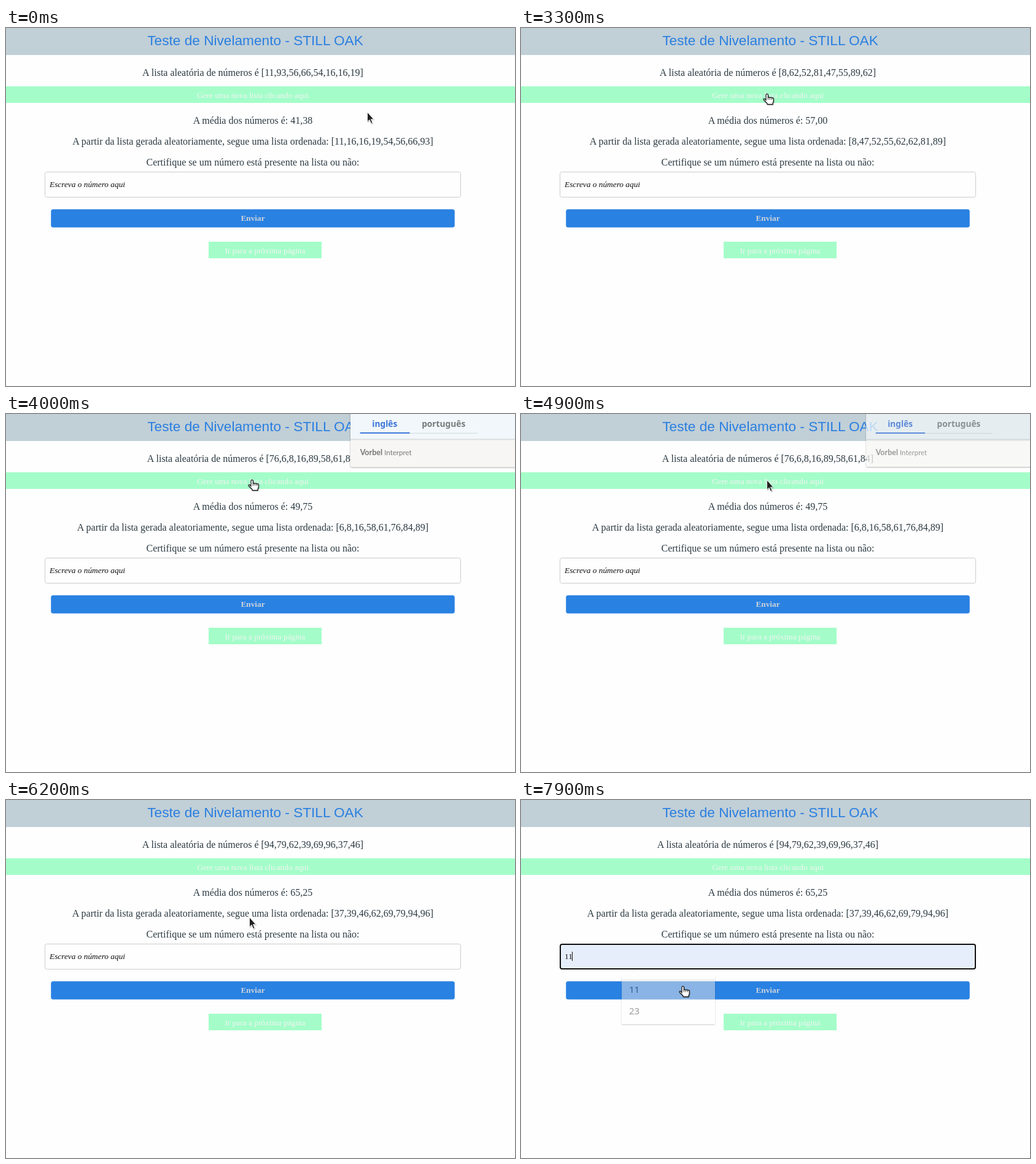
Animation of 829x583 px, one loop 8000 ms. Source, as an HTML page:

```html
<!DOCTYPE html>
<html lang="pt-BR">
<head>
<meta charset="utf-8">
<title>Teste de Nivelamento</title>
<style>
  html, body { margin: 0; width: 100%; height: 100%; overflow: hidden; background: #fefefe; }
  svg { display: block; width: 829px; height: 583px; }
  text { white-space: pre; }
  .line { font: 16px "Liberation Serif", serif; fill: #2c3a42; text-anchor: middle; }
  .label { font: 13.333px "Liberation Serif", serif; fill: #f3f3f3; text-anchor: middle; }
  .send { font-weight: bold; fill: #ccd3db; }
  .field { font: 13.333px "Liberation Serif", serif; fill: #111; }
  .hint { font-style: italic; }
  .tab { font: bold 13.7px "Noto Sans", sans-serif; }
  .option { font: 15px "Noto Sans", sans-serif; fill: #3c3c3c; }
  .brand { font: 11.5px Lato, sans-serif; fill: #777; }
</style>
</head>
<body>
<svg viewBox="0 0 829 583">
  <defs>
    <filter id="shadow" x="-10%" y="-10%" width="120%" height="125%">
      <feDropShadow dx="0" dy="1" stdDeviation="1.3" flood-opacity=".4"/>
    </filter>
    <filter id="soft" x="-30%" y="-30%" width="170%" height="170%">
      <feDropShadow dx=".7" dy="1" stdDeviation=".7" flood-opacity=".35"/>
    </filter>
  </defs>

  <rect width="829" height="583" fill="#fefefe"/>
  <rect width="829" height="44" fill="#c1cfd7"/>
  <text x="230.300" y="28" font-family="Liberation Sans, sans-serif" font-size="22.65" fill="#2a7fe0">Teste de Nivelamento - STILL OAK</text>

  <text id="list" class="line" x="402" y="78"></text>
  <rect y="95" width="829" height="27" fill="#a4fdc9"/>
  <text class="label" x="402" y="114">Gere uma nova lista clicando aqui</text>
  <text id="mean" class="line" x="402" y="156"></text>
  <text id="sorted" class="line" x="402" y="190"></text>
  <text class="line" x="402" y="224">Certifique se um número está presente na lista ou não:</text>

  <rect id="input" rx="3"/>
  <text id="hint" class="field hint" x="71" y="259">Escreva o número aqui</text>
  <text id="value" class="field" x="71" y="259">11</text>
  <rect id="caret" x="83" y="247" width="1" height="15" fill="#111"/>

  <rect x="73.250" y="295.250" width="657.500" height="29.500" rx="3.5" fill="#2981e2"/>
  <text class="label send" x="402" y="314">Enviar</text>
  <rect x="330" y="348" width="184" height="27" fill="#a4fdc9"/>
  <text class="label" x="422" y="367">Ir para a próxima página</text>

  <g id="options">
    <path d="M164 287H175L183.500 279L192 287H316V365H164Z" fill="#fff" filter="url(#shadow)"/>
    <rect id="row" x="164" y="291.500" width="152" height="34" fill="#e8e8e8"/>
    <text class="option" x="176" y="314">11</text>
    <text class="option" x="176" y="349">23</text>
  </g>

  <g id="bubble">
    <rect x="562" y="-12" width="290" height="98" rx="2" fill="#f7f6f4" filter="url(#shadow)"/>
    <rect x="562" y="-12" width="290" height="53" fill="#f1f7fa"/>
    <rect x="562" y="40.500" width="290" height="2" fill="#dcdedf"/>
    <rect x="658" y="31" width="110" height="1" fill="#d3dadd"/>
    <rect x="577.500" y="30" width="80.500" height="2" fill="#3c74d8"/>
    <text class="tab" x="597" y="21" fill="#3c74d8">inglês</text>
    <text class="tab" x="677.500" y="21" fill="#767a7c">português</text>
    <text class="brand" x="577.500" y="67"><tspan font-size="12.5" font-weight="bold">Vorbel</tspan> Interpret</text>
  </g>

  <!-- each pointer has its hotspot at 0,0 -->
  <g id="cursor" filter="url(#soft)">
    <path id="arrow" d="M.5 .5V16.200L4 13L6.600 19L9 18L6.500 12.200H11Z" fill="#222" stroke="#fff" stroke-width=".9"/>
    <g id="hand" transform="translate(-5.500 0)" stroke="#151515" stroke-linejoin="round">
      <path d="M4.500 11V2a1.700 1.700 0 0 1 3.400 0V7a1.500 1.500 0 0 1 3 .2a1.500 1.500 0 0 1 3 .5a1.400 1.400 0 0 1 2.800 .8V12q0 2-1.200 3.200V17.300H6.500V15.800L1 10.500q-1.200-1.800 .6-2.300q1.300 0 2.900 2.800Z" fill="#fff" stroke-width="1.200"/>
      <path d="M7.900 7V10M10.900 7.500V10M13.900 8V10" fill="none" stroke-width=".8"/>
    </g>
    <path id="beam" transform="translate(-4.500 -8.500)" d="M1 .5H3.500L4.500 1.500L5.500 .5H8M4.500 1.500V16.500M1 17.500H3.500L4.500 16.500L5.500 17.500H8" fill="none" stroke="#222" stroke-width="1.200"/>
  </g>
</svg>

<script>
const LOOP = 8000, STEP = 100, PRESS = 200;
const $ = id => document.getElementById(id);
const show = (id, on) => $(id).style.display = on ? "" : "none";
const set = (id, attrs) => Object.entries(attrs).forEach(([k, v]) => $(id).setAttribute(k, v));

const ramp = (t, start, end) => Math.max(0, Math.min(1, (t - start) / (end - start)));
const ease = p => p * p * (3 - 2 * p);
const mix = (a, b, p) => a + (b - a) * p;

const lists = [
  { at: 0, nums: "11,93,56,66,54,16,16,19" },
  { at: 2300, nums: "8,62,52,81,47,55,89,62" },
  { at: 3700, nums: "76,6,8,16,89,58,61,84" },
  { at: 5100, nums: "94,79,62,39,69,96,37,46" }
];
const clicks = [2000, 3500];

// The pointer travels to each stop; bow bends the way up or down.
const home = { x: 588, y: 136.5 };
const stops = [
  { from: 300, to: 900, x: 268, y: 72, bow: -58 },
  { from: 1000, to: 1400, x: 400, y: 107, bow: 107, shape: "hand" },
  { from: 4900, to: 5200, x: 735, y: 65, bow: 0 },
  { from: 5600, to: 5800, x: 683, y: 181, bow: 0 },
  { from: 5900, to: 6200, x: 396, y: 190.5, bow: 18 },
  { from: 6300, to: 6600, x: 260, y: 250, bow: 0, shape: "beam" },
  { from: 7100, to: 7300, x: 263, y: 303, bow: 0, shape: "hand" }
];

function pointer(t) {
  let { x, y } = home, shape = "arrow";
  for (const s of stops.filter(s => t >= s.from)) {
    const p = ease(ramp(t, s.from, s.to));
    x = mix(x, s.x, p);
    y = mix(y, s.y, p) + s.bow * Math.sin(Math.PI * p);
    shape = p === 1 && s.shape || "arrow";
  }
  const pressed = clicks.some(c => t >= c && t < c + PRESS);
  return { x, y: y + pressed, shape };
}

function drawLists(t) {
  const text = lists.filter(l => l.at <= t).pop().nums;
  const nums = text.split(",").map(Number);
  const mean = nums.reduce((a, b) => a + b) / nums.length;
  nums.sort((a, b) => a - b);
  $("list").textContent = `A lista aleatória de números é [${text}]`;
  $("mean").textContent = `A média dos números é: ${mean.toFixed(2).replace(".", ",")}`;
  $("sorted").textContent = `A partir da lista gerada aleatoriamente, segue uma lista ordenada: [${nums}]`;
}

function drawField(t) {
  const focus = t >= 6500, filled = t >= 7300, w = focus ? 2 : 1;
  set("input", {
    x: 63 + w / 2, y: 234 + w / 2, width: 678 - w, height: 42 - w,
    fill: filled ? "#e7eefb" : "#fefefe",
    stroke: focus ? "#101010" : "#ccc", "stroke-width": w
  });
  show("hint", !filled);
  show("value", filled);
  show("caret", t >= 7800);
  show("row", filled);
  set("options", { opacity: ramp(t, 6400, 6600) - ramp(t, 7700, 8100) });
}

function drawBubble(t) {
  const a = ramp(t, 3600, 4000) - ramp(t, 4800, 5200);
  const s = mix(.98, 1.005, a);
  set("bubble", { opacity: a, transform: `translate(750 60) scale(${s}) translate(-750 -60)` });
}

function drawCursor(t) {
  const { x, y, shape } = pointer(t);
  ["arrow", "hand", "beam"].forEach(id => show(id, id === shape));
  set("cursor", { transform: `translate(${x} ${y})` });
}

const start = performance.now();
function frame() {
  const t = Math.floor((performance.now() - start) % LOOP / STEP) * STEP;
  drawLists(t);
  drawField(t);
  drawBubble(t);
  drawCursor(t);
  requestAnimationFrame(frame);
}
frame();
</script>
</body>
</html>
```
